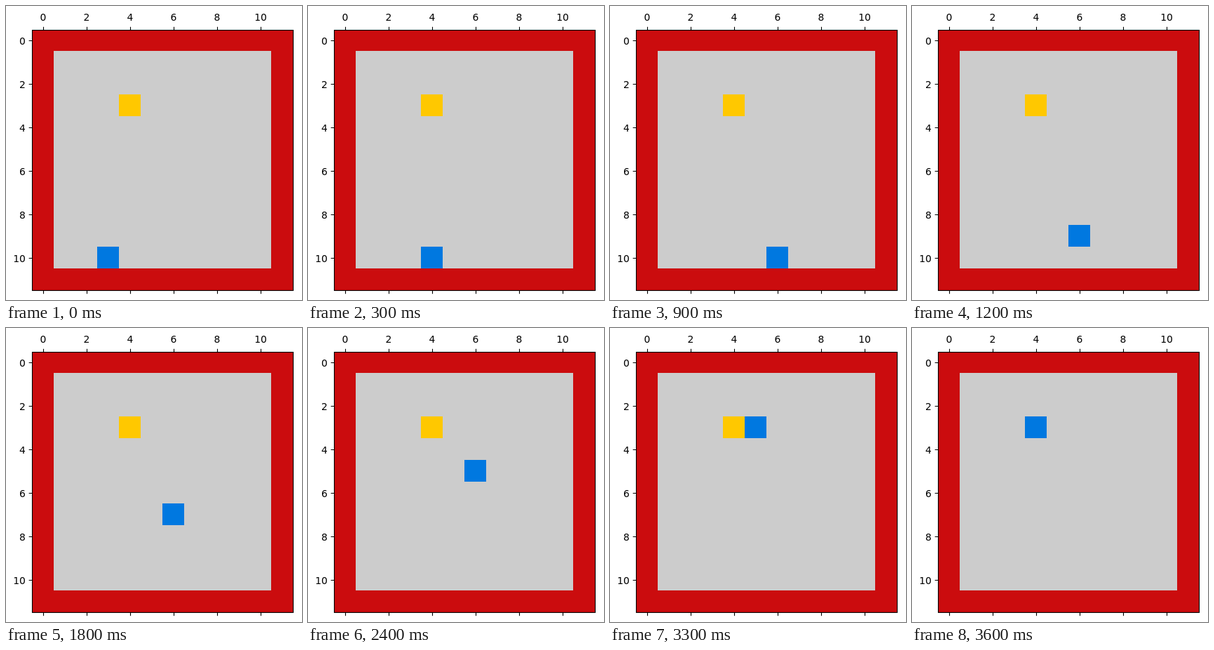
Recreate the animation shown at these times as an HTML page. Size 422 by 419 pixels, loop 3900 ms.

```html
<!DOCTYPE html>
<html lang="en">
<head>
<meta charset="utf-8">
<title>Grid walk</title>
<style>
  html, body { margin: 0; width: 100%; height: 100%; overflow: hidden; background: #fff; }
  svg { display: block; }
  text { font: 13.89px "DejaVu Sans", sans-serif; fill: #000; }
  .axis { fill: none; stroke: #000; stroke-width: 1.11; }
</style>
</head>
<body>
<svg id="stage" width="422" height="419" viewBox="0 0 422 419">
  <rect x="37" y="34" width="372" height="372" fill="#cb0c0e"/>
  <rect x="68" y="64" width="310" height="310" fill="#ccc"/>
  <rect id="goal" width="31" height="31" fill="#ffc800"/>
  <rect id="walker" width="31" height="31" fill="#0078e0"/>
  <rect class="axis" x="37.5" y="34.5" width="372" height="371"/>
</svg>
<script>
const CELL = 31, LEFT = 37, TOP = 33, STEP_MS = 300;
const stage = document.getElementById('stage');
const walker = document.getElementById('walker');

function add(tag, attrs, content = '') {
  const el = document.createElementNS('http://www.w3.org/2000/svg', tag);
  for (const key in attrs) el.setAttribute(key, attrs[key]);
  el.textContent = content;
  stage.append(el);
}

function place(el, [col, row]) {
  el.setAttribute('x', LEFT + col * CELL);
  el.setAttribute('y', TOP + row * CELL);
}

for (let n = 0; n <= 10; n += 2) {
  const x = 53.5 + n * CELL, y = 49.5 + n * CELL;
  add('path', { class: 'axis', d: `M${x} 34.5v-4.86M${x} 405.5v4.86M37.5 ${y}h-4.86` });
  add('text', { x: x - 0.5, y: 21, 'text-anchor': 'middle' }, n);
  add('text', { x: 27.8, y: y + 5.5, 'text-anchor': 'end' }, n);
}

// Right along the floor, up to the goal's row, then left onto the goal.
const path = [[3, 10]];
function walk(dx, dy, count) {
  while (count--) {
    const [col, row] = path[path.length - 1];
    path.push([col + dx, row + dy]);
  }
}
walk(1, 0, 3);
walk(0, -1, 7);
walk(-1, 0, 2);

place(document.getElementById('goal'), [4, 3]);

function render(ms) {
  place(walker, path[Math.floor(ms / STEP_MS) % path.length]);
}

const start = performance.now();
function tick() {
  render(performance.now() - start);
  requestAnimationFrame(tick);
}
tick();
</script>
</body>
</html>
```
